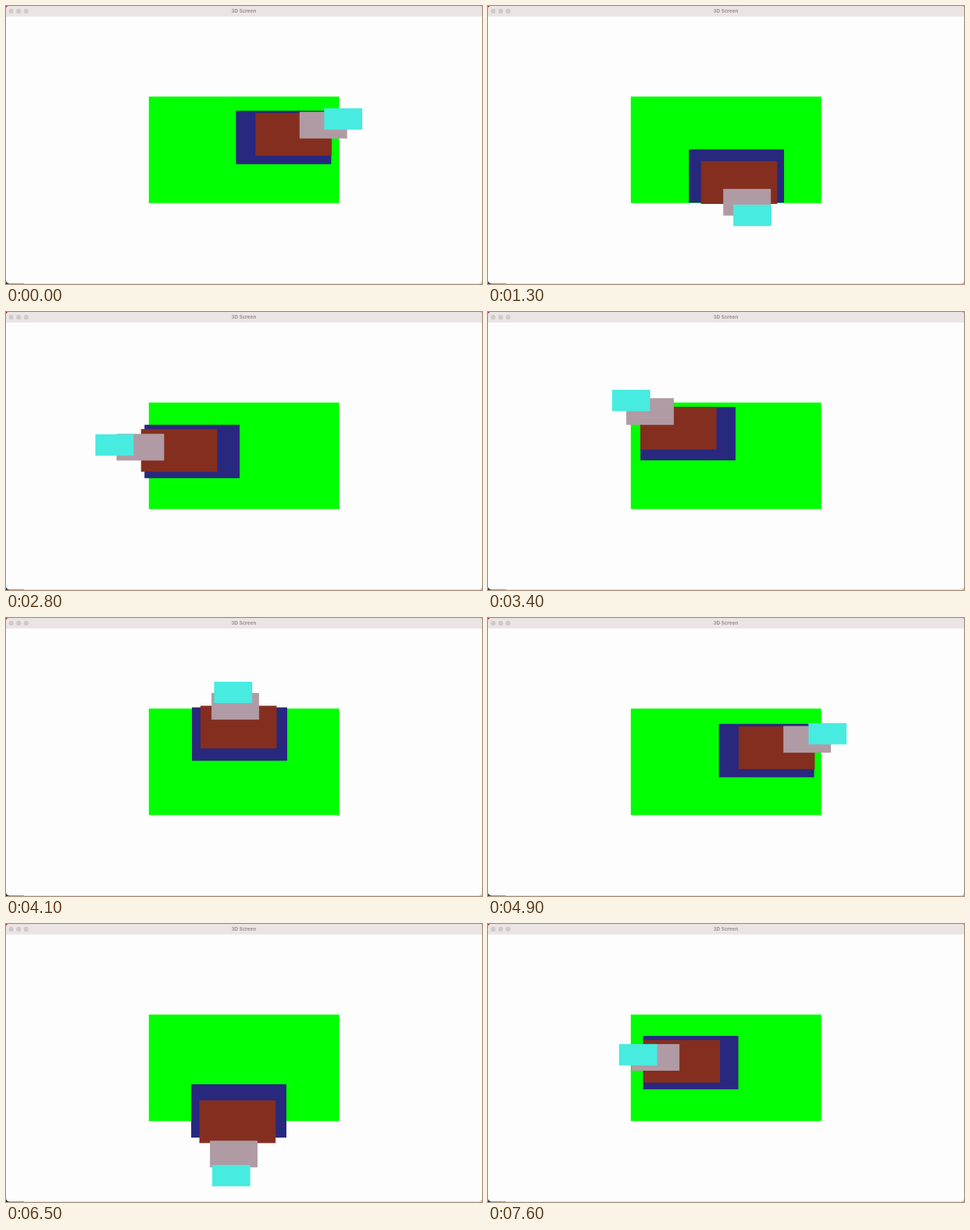
An HTML page that plays this animation: 640 px wide and 375 px high, repeating every 7.7 s.

```html
<!DOCTYPE html>
<html lang="en">
<head>
<meta charset="utf-8">
<title>3D Screen</title>
<style>
  html, body { margin: 0; width: 100%; height: 100%; overflow: hidden; background: #fdfdfd; }
  svg { display: block; width: 640px; height: 375px; }
  text { font: 700 6.6px Inter, "Liberation Sans", sans-serif; fill: #989091; text-anchor: middle; }
</style>
</head>
<body>
<svg viewBox="0 0 640 375">
  <rect width="6" height="6" fill="#a83650"/>
  <rect x="634" width="6" height="6" fill="#c9c4c5"/>
  <rect y="369" width="24" height="6" fill="#24393e"/>
  <rect x="24" y="369" width="616" height="6" fill="#c8c8c8"/>
  <rect width="640" height="374.4" rx="4.5" fill="#fdfdfd"/>
  <path d="M0 14.3V4.5A4.5 4.5 0 0 1 4.5 0H635.5A4.5 4.5 0 0 1 640 4.5V14.3Z" fill="#ebe4e5"/>
  <g fill="#d0c9ca">
    <circle cx="7" cy="7" r="3.2"/>
    <circle cx="17" cy="7" r="3.2"/>
    <circle cx="27" cy="7" r="3.2"/>
  </g>
  <text x="319.7" y="9.3">3D Screen</text>
  <rect x="192" y="122.2" width="256" height="143.6" fill="#00ff00"/>
  <g id="layers"></g>
</svg>
<script>
const LOOP = 7700, STEP = 100;
const CENTER = { x: 319.8, y: 194 };
const BACK = { width: 256, height: 144 };

// Each panel shrinks with its depth; its shift grows with it.
const NEAREST = 5;
const panels = [
  { depth: 2, color: '#28287e' },
  { depth: 2.5, color: '#842e20' },
  { depth: 4, color: '#b09ba5' },
  { depth: NEAREST, color: '#48ebe0' }
];

// Two turns around the center: step count and offset of the nearest panel.
const turns = [
  [0, 133.6, -41.6], [13, 35.6, 88.4], [24, -166, 46], [28, -174, -14.6],
  [41, -14.4, -93.6], [48, 130, -52.6], [52, 140, 15], [57, 122.6, 96],
  [62, 50, 165], [65, -17, 145.4], [72, -130, 57.2], [76, -118, -17.6]
];

// Smooth curve through [time, value] points, with parabolic ends.
function spline(points) {
  const last = points.length - 1;
  const gap = i => points[i + 1][0] - points[i][0];
  const secant = i => (points[i + 1][1] - points[i][1]) / gap(i);
  const slope = i => {
    if (i === 0) return 2 * secant(0) - slope(1);
    if (i === last) return 2 * secant(last - 1) - slope(last - 1);
    return (secant(i - 1) * gap(i) + secant(i) * gap(i - 1)) / (gap(i - 1) + gap(i));
  };
  return time => {
    let i = 0;
    while (i < last - 1 && time >= points[i + 1][0]) i++;
    const u = (time - points[i][0]) / gap(i), v = 1 - u;
    return v * v * (1 + 2 * u) * points[i][1] + u * u * (1 + 2 * v) * points[i + 1][1]
      + gap(i) * u * v * (v * slope(i) - u * slope(i + 1));
  };
}

const offsetX = spline(turns.map(([time, x]) => [time, x]));
const offsetY = spline(turns.map(([time, , y]) => [time, y]));

const layers = document.getElementById('layers');
for (const panel of panels) {
  panel.width = BACK.width / panel.depth;
  panel.height = BACK.height / panel.depth;
  panel.node = document.createElementNS('http://www.w3.org/2000/svg', 'rect');
  panel.node.setAttribute('width', panel.width);
  panel.node.setAttribute('height', panel.height);
  panel.node.setAttribute('fill', panel.color);
  layers.append(panel.node);
}

function draw(elapsed) {
  const time = Math.floor((elapsed % LOOP) / STEP);
  const dx = offsetX(time), dy = offsetY(time);
  for (const { depth, width, height, node } of panels) {
    const shift = depth / NEAREST;
    node.setAttribute('x', CENTER.x + dx * shift - width / 2);
    node.setAttribute('y', CENTER.y + dy * shift - height / 2);
  }
}

let start;
function tick(now) {
  start ??= now;
  draw(now - start);
  requestAnimationFrame(tick);
}
draw(0);
requestAnimationFrame(tick);
</script>
</body>
</html>
```
